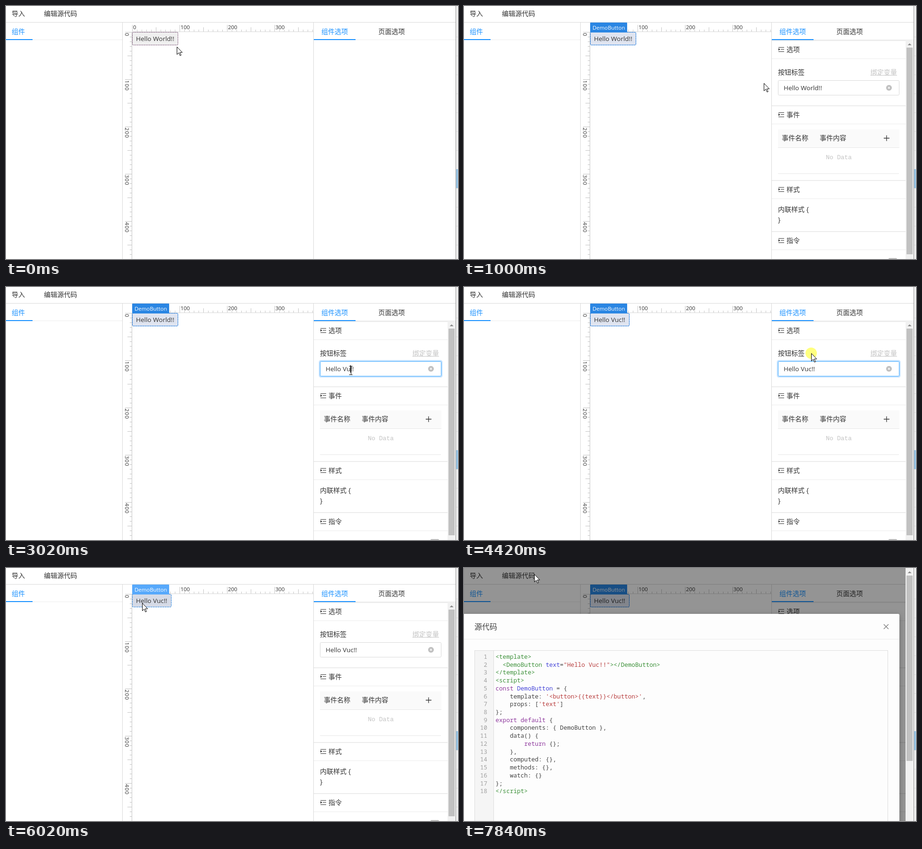
An HTML page that plays this animation: 953 by 535 pixels, repeating every 8000 ms.

```html
<!DOCTYPE html>
<html lang="zh">
<head>
<meta charset="utf-8">
<style>
html, body { margin: 0; width: 100%; height: 100%; overflow: hidden; background: #fff; }
svg { display: block; width: 953px; height: 535px; }
text { white-space: pre; font-family: "Open Sans", "Noto Sans CJK SC", "Noto Sans CJK", sans-serif; }
.mono { font-family: "Noto Sans Mono", "DejaVu Sans Mono", monospace; }
.thin { font-family: "Liberation Mono", monospace; }
</style>
</head>
<body>
<svg id="stage" viewBox="0 0 953 535"></svg>
<script>
const INK = '#333', BLUE = '#1890ff', LINE = '#d9d9d9', PALE = '#ececec';

const rect = (x, y, w, h, fill, more = '') =>
  `<rect x="${x}" y="${y}" width="${w}" height="${h}" fill="${fill}" ${more}/>`;
const text = (x, y, s, fill = INK, size = 14, more = '') =>
  `<text x="${x}" y="${y}" font-size="${size}" fill="${fill}" ${more}>${s}</text>`;
const path = (d, stroke, width = 1, fill = 'none') =>
  `<path d="${d}" fill="${fill}" stroke="${stroke}" stroke-width="${width}"/>`;
const range = (n, f) => Array.from({ length: n }, (_, i) => f(i)).join('');

function rulers() {
  const tick = i => i % 10 ? (i % 5 ? 4 : 9) : 14;
  return range(39, i => rect(266 + i * 10, 54 - tick(i), 1, tick(i), '#c4c4c4')) +
    range(48, i => rect(265 - tick(i), 55 + i * 10, tick(i), 1, '#c4c4c4')) +
    rect(266, 54, 382, 1, LINE) + rect(265, 55, 1, 480, '#c4c4c4') +
    range(4, i => text(268 + i * 100, 49, i * 100, INK, 11.4)) +
    range(5, i => text(0, 0, i * 100, INK, 11.4,
      `letter-spacing="1" transform="translate(251 ${57 + i * 100}) rotate(90)"`));
}

const frame = rect(0, 34, 948, 1, LINE) +
  text(12, 21, '导入') + text(80, 21, '编辑源代码') +
  rect(0, 71, 245, 1, PALE) + rect(245, 35, 1, 500, LINE) +
  text(12, 59, '组件', BLUE) + rect(0, 70, 56, 2, BLUE) +
  rulers() +
  rect(648, 35, 1, 500, LINE) + rect(649, 71, 299, 1, PALE) +
  text(665, 59, '组件选项', BLUE) + rect(649, 70, 88, 2, BLUE) + text(785, 59, '页面选项');

const edge = rect(948, 0, 5, 535, '#f3f3f3') +
  range(12, i => rect(949, 65 + i * 40, 4, 1, '#e2e2e2')) +
  rect(949, 345, 4, 40, '#9cc8e8') + rect(948, 0, 1, 535, '#8c8c8c');

const scrollbar = (top, end) => rect(931, top, 17, 535 - top, '#f1f1f1') +
  rect(933, top + 16, 13, end - top - 16, '#c1c1c1') +
  `<path d="M935.5 ${top + 11}l4-4 4 4z" fill="#8a8a8a"/>`;

const heading = (y, s) => rect(649, y - 20, 282, 2, PALE) + rect(649, y + 19, 282, 1, PALE) +
  path(`M663 ${y - 4.5}h12M668 ${y - .5}h7M663 ${y + 4.5}h12`, INK, 1.2) +
  `<path d="M663 ${y - 3}l3.5 2.7-3.5 2.7z" fill="${INK}"/>` + text(680, y + 5, s);

const options = heading(92, '选项') + heading(230, '事件') + heading(388, '样式') + heading(496, '指令') +
  text(662, 145, '按钮标签') + text(857, 145, '绑定变量', '#c4c4c4') + rect(857, 146, 56, 1, '#c4c4c4') +
  rect(662, 261, 256, 38, '#fafafa') + rect(662, 299, 256, 1, '#e8e8e8') +
  text(670, 284, '事件名称') + text(750, 284, '事件内容') +
  path('M885 279.5h12M891 273.5v12', INK, 1.3) +
  text(763, 324, 'No Data', '#c4c4c4', 13, 'class="thin"') + rect(662, 354, 255, 1, '#e8e8e8') +
  text(662, 435, '内联样式 {') + text(662, 457, '}') +
  rect(895, 533, 18, 4, '#bdbdbd', 'rx="2"');

function input(s) {
  const glow = s.focus ? rect(661, 156, 258, 34, 'none', 'rx="3" stroke="#1890ff" stroke-opacity=".25" stroke-width="3"') : '';
  const label = s.select ? 'Hello <tspan fill="#fff">World</tspan>!!' : `Hello ${s.word}!!`;
  return glow +
    rect(662.5, 157.5, 255, 31, '#fff', `rx="2" stroke="${s.focus || s.over ? '#40a9ff' : LINE}"`) +
    (s.select ? rect(710, 163, 36, 20, '#3390ff') : '') +
    text(674, 178, label, INK, 13.5) +
    (s.caret ? rect(s.caret, 165, 1, 16, '#000') : '') +
    '<circle cx="896" cy="173" r="6" fill="#bfbfbf"/>' +
    path('M894 171l4 4m0-4l-4 4', '#fff', 1.1);
}

function button(s) {
  const w = s.shown === 'World' ? 96 : 82;
  const box = (fill, stroke, more = '') => rect(266.5, 55.5, w, 27, fill, `rx="2" stroke="${stroke}" ${more}`);
  const dash = 'stroke-dasharray="3 2"';
  const look = !s.tag ? box('#efefef', '#7d6f7d') + box('none', '#b48fb0', dash)
    : s.tag === 'hover' ? box('#d5dae6', '#9cc4ee') + box('none', '#2a86e3', dash)
    : box('#dfe4f0', '#5a9fe8') + box('none', '#1f78dc', dash);
  const tag = s.tag ? rect(266, 35, 78, 21, s.tag === 'hover' ? '#57a9fb' : '#2a86e3', 'rx="1"') +
    text(271, 50, 'DemoButton', '#fff', 11.4) : '';
  return look + text(274, 74, `Hello ${s.shown}!!`, INK, 13.5) + tag;
}

function pointer(s) {
  const spot = s.click ? `<circle cx="${s.x}" cy="${s.y}" r="12" fill="#ffff00" fill-opacity=".5"/>` : '';
  const shape = s.beam
    ? path('M-3.5-8.5h3l.5.5.5-.5h3M.5-8v17M-3.5 9.5h3l.5-.5.5.5h3', '#000')
    : path('M.5.5V16.5l3.7-3.5 2.8 6 2.3-1-2.8-5.8h5.2z', '#000', 1, '#fff');
  return spot + `<g transform="translate(${s.x} ${s.y})">${shape}</g>`;
}

const code = `<template>
  <DemoButton text="Hello Vuc!!"></DemoButton>
</template>
<script>
const DemoButton = {
    template: '<button>{{text}}</button>',
    props: ['text']
};
export default {
    components: { DemoButton },
    data() {
        return {};
    },
    computed: {},
    methods: {},
    watch: {}
};
<\/script>`.split('\n');

// Groups in order: string, tag, keyword, definition
const token = /('[^']*'|"[^"]*")|(<\/?\w+>?|>)|\b(const|export|default|return)\b|(text(?==)|DemoButton(?= =))/g;
const tints = ['#b94040', '#3d913a', '#8f3a9e', '#4646d8'];
const paint = line => line.replace(token, (m, ...groups) =>
  `<tspan fill="${tints[groups.findIndex(Boolean)]}">${m.replace(/</g, '&lt;')}</tspan>`);

const dialog = rect(0, 0, 931, 535, '#000', 'fill-opacity=".42"') +
  rect(-10, 97, 928, 450, '#fdfdfd', 'rx="3" style="filter:drop-shadow(0 3px 6px #0004)"') +
  text(22, 130, '源代码', '#444', 16) + path('M885 119l10 10m0-10l-10 10', '#888', 1.5) +
  rect(0, 150, 918, 1, PALE) +
  rect(22.5, 174.5, 871, 400, '#fdfdfd', 'stroke="#ddd"') +
  rect(23, 175, 39, 360, '#f5f5f5') + rect(62, 175, 1, 360, '#ddd') +
  code.map((line, i) => {
    const y = 192 + i * 16.72;
    return text(49, y, i + 1, '#a0a0a0', 12.58, 'class="mono" text-anchor="end"') +
      text(66.5, y, paint(line), '#444', 12.58, 'class="mono"');
  }).join('');

const draw = s => rect(0, 0, 953, 535, '#fff') +
  (s.menu ? rect(64, 0, 102, 34, '#fafafa') : '') + frame +
  (s.panel ? options + input(s) + scrollbar(72, 525) : '') +
  button(s) + (s.modal ? dialog : '') + (s.page ? scrollbar(0, s.page) : '') + edge + pointer(s);

// Each step: start time, pointer x, y, and what changes from the step before
const steps = [
  [0, 360, 86, { word: 'World', shown: 'World' }],
  [200, 342, 74, { tag: 'hover' }],
  [400, 342, 74, { panel: 1, click: 1 }],
  [600, 342, 74, { click: 0 }],
  [1000, 632, 163, { tag: 'on' }],
  [1200, 712, 184, { over: 1 }],
  [1400, 727, 176, { beam: 1 }],
  [1800, 727, 176, { focus: 1, click: 1 }],
  [2000, 727, 176, { select: 1, click: 0 }],
  [2420, 727, 176, { select: 0, word: 'V', caret: 719 }],
  [3020, 727, 176, { word: 'Vu', caret: 726 }],
  [3220, 727, 176, { word: 'Vuc', caret: 733 }],
  [3620, 728, 170, { caret: 0 }],
  [3820, 730, 152, { beam: 0, over: 0 }],
  [4020, 732, 143, {}],
  [4220, 732, 140, {}],
  [4420, 732, 140, { click: 1, shown: 'Vuc' }],
  [4620, 732, 140, { click: 0, focus: 0 }],
  [4820, 660, 132, {}],
  [5020, 500, 112, {}],
  [5220, 330, 92, {}],
  [5420, 201, 78, {}],
  [5620, 250, 66, {}],
  [5820, 285, 65, { tag: 'hover' }],
  [6020, 287, 74, {}],
  [7220, 215, 42, { tag: 'on' }],
  [7420, 148, 13, { menu: 1 }],
  [7640, 148, 13, { page: 401 }],
  [7840, 148, 13, { page: 408, modal: 1, menu: 0 }]
];
let state = {};
const scenes = steps.map(([at, x, y, change]) => {
  state = { ...state, x, y, ...change };
  return { at, svg: draw(state) };
});

const stage = document.getElementById('stage');
let current;
function tick() {
  const t = performance.now() % 8000;
  const scene = scenes.findLast(s => s.at <= t);
  if (scene !== current) stage.innerHTML = (current = scene).svg;
  requestAnimationFrame(tick);
}
tick();
</script>
</body>
</html>
```
